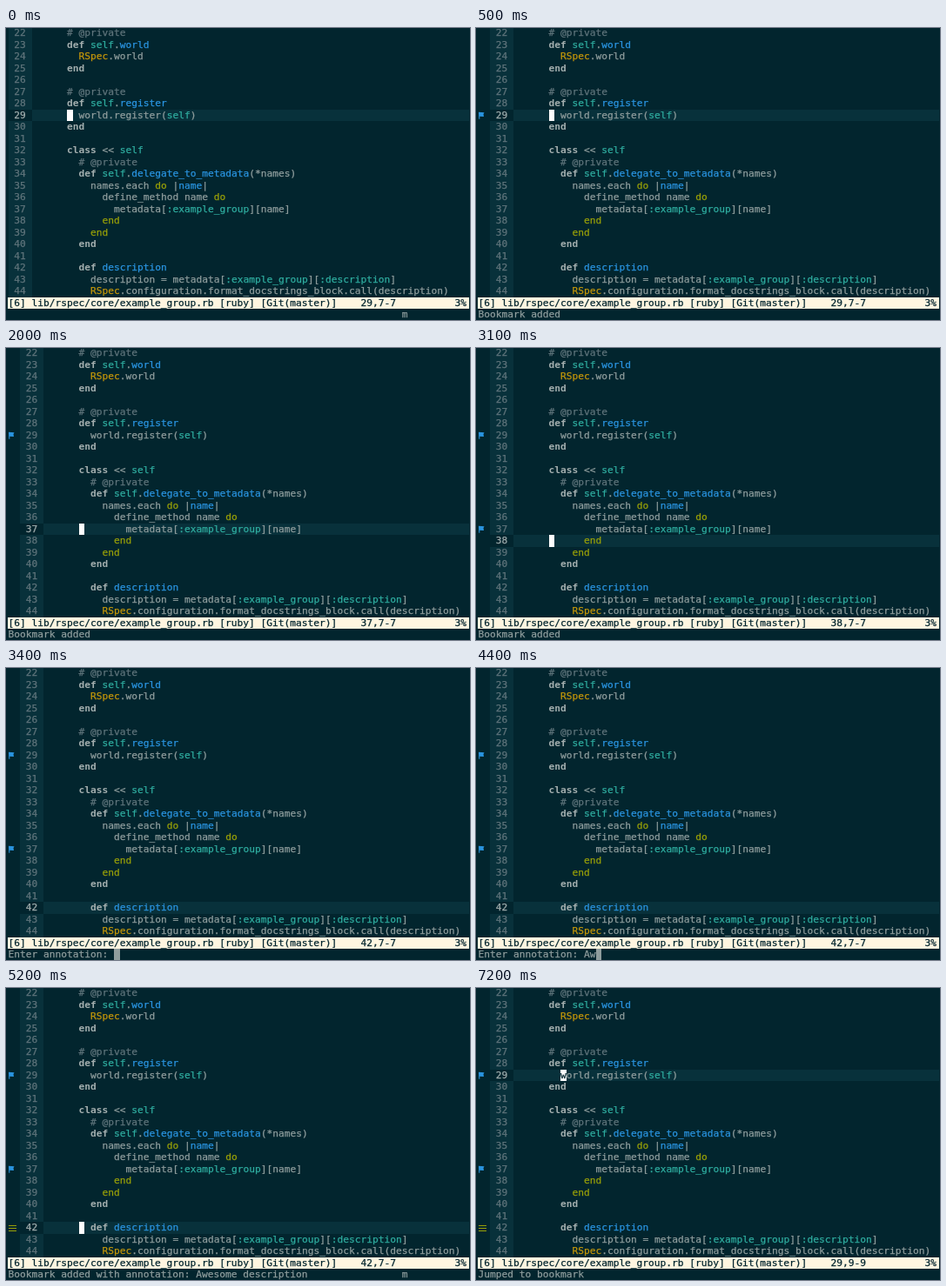
An HTML page with a canvas for the animation above (8 s loop, 533 by 336 pixels).

```html
<!DOCTYPE html>
<html lang="en">
<head>
<meta charset="utf-8">
<title>Editor bookmarks</title>
<style>
html, body { margin: 0; height: 100%; overflow: hidden; background: #02252e; }
canvas { display: block; }
</style>
</head>
<body>
<canvas id="stage" width="533" height="336"></canvas>
<script>
const ctx = document.getElementById('stage').getContext('2d');
const LOOP = 8000, LEFT = 2.5, EDGE = 2, RIGHT = 532, CW = 6.75, RH = 13.5, FIRST = 22;
const BG = '#02252e', RAISED = '#08313b', TEXT = '#8f9d9d', DIM = '#5f747b',
  BRIGHT = '#a3aeae', CREAM = '#fff5e0', WHITE = '#fefefe', CYAN = '#2fac9f',
  BLUE = '#2a94e0', YELLOW = '#c4960a', GREEN = '#98a008';
const FONT = '11.21px "DejaVu Sans Mono", monospace';

const code = `      # @private
      def self.world
        RSpec.world
      end

      # @private
      def self.register
        world.register(self)
      end

      class << self
        # @private
        def self.delegate_to_metadata(*names)
          names.each do |name|
            define_method name do
              metadata[:example_group][name]
            end
          end
        end

        def description
          description = metadata[:example_group][:description]
          RSpec.configuration.format_docstrings_block.call(description)`.split('\n');

// One capture group per colour, in the order of tokenColors
const tokens = /(#.*)|(\bself\b|:\w+)|(RSpec)|(\bdo\b|(?<= {10})end)|((?<=def |def self\.|\|)\w+)|(\b(?:def|class|end)\b)|(\s+|\w+|.)/g;
const tokenColors = [DIM, CYAN, YELLOW, GREEN, BLUE, BRIGHT, TEXT];
const BOLD = 5;

// Each entry changes part of the state from its time on
const timeline = [
  [0, { line: 29, col: 7, flags: [], note: 0, msg: '', cmd: 'm', prompt: false }],
  [500, { flags: [29], msg: 'Bookmark added', cmd: '' }],
  [1500, { line: 30 }],
  [1600, { line: 32 }],
  [1700, { line: 34 }],
  [1900, { line: 36 }],
  [2000, { line: 37 }],
  [2100, { flags: [29, 37] }],
  [3100, { line: 38 }],
  [3200, { line: 40 }],
  [3300, { line: 42 }],
  [3400, { prompt: true }],
  [5200, { prompt: false, note: 42, cmd: 'm',
           msg: 'Bookmark added with annotation: Awesome description' }],
  [7200, { line: 29, col: 9, msg: 'Jumped to bookmark', cmd: '' }]
];

const colX = col => LEFT + col * CW;
const rowY = row => row * RH - 0.75;

// Fills whole pixels between two corners
function rect(x1, y1, x2, y2, color) {
  const [left, top, right, bottom] = [x1, y1, x2, y2].map(Math.round);
  ctx.fillStyle = color;
  ctx.fillRect(left, top, right - left, bottom - top);
}

const fillCell = (col, row, color) =>
  rect(colX(col), rowY(row), colX(col + 1), rowY(row + 1), color);

function write(text, col, row, color, bold) {
  const x = colX(col), y = rowY(row) + 10;
  ctx.font = (bold ? 'bold ' : '') + FONT;
  ctx.fillStyle = ctx.strokeStyle = color;
  ctx.lineWidth = 0.25;
  ctx.fillText(text, x, y);
  if (!bold) ctx.strokeText(text, x, y);
}

function drawCode(text, col, row) {
  for (const m of text.matchAll(tokens)) {
    const kind = m.slice(1).findIndex(g => g !== undefined);
    write(m[0], col + m.index, row, tokenColors[kind], kind === BOLD);
  }
}

function drawFlag(row) {
  const points = [[3, 3], [9.5, 3.5], [8.5, 5.5], [9, 8.3], [4.3, 8], [4.3, 11], [3.3, 11]];
  ctx.fillStyle = BLUE;
  ctx.beginPath();
  for (const [x, y] of points) ctx.lineTo(x, rowY(row) + y);
  ctx.fill();
}

function drawNote(row) {
  const top = Math.round(rowY(row)) + 4;
  for (let y = top; y < top + 9; y += 3) rect(3, y, 12, y + 1, GREEN);
}

function typed(t) {
  if (t < 4400) return '';
  const step = Math.min(7, Math.floor((t - 4400) / 100));
  return 'Awesome description'.slice(0, Math.round(2 + 17 * step / 7));
}

function draw(t) {
  const s = {};
  for (const [time, change] of timeline) if (t >= time) Object.assign(s, change);
  const signs = s.flags.length ? 2 : 0;
  const start = signs + 4;
  const current = s.line - FIRST;

  rect(0, 0, 533, 336, BG);
  rect(colX(signs), 0, colX(start), rowY(23), RAISED);
  rect(colX(signs), rowY(current), colX(start), rowY(current + 1), BG);
  rect(colX(start), rowY(current), RIGHT, rowY(current + 1), RAISED);
  code.forEach((text, row) => {
    write(FIRST + row, signs + 1, row, row === current ? BRIGHT : DIM);
    drawCode(text, start, row);
  });
  s.flags.forEach(line => drawFlag(line - FIRST));
  if (s.note) drawNote(s.note - FIRST);

  if (!s.prompt) {
    const col = start + s.col - 1;
    fillCell(col, current, WHITE);
    write(code[current][s.col - 1] || ' ', col, current, BG);
  }

  rect(EDGE, rowY(23), RIGHT, rowY(24), CREAM);
  write('[6] lib/rspec/core/example_group.rb [ruby] [Git(master)]', 0, 23, BG);
  write(`${s.line},${s.col}-${s.col}`, 60, 23, BG);
  write('3%', 76, 23, BG);

  const msg = s.prompt ? 'Enter annotation: ' + typed(t) : s.msg;
  write(msg, 0, 24, TEXT);
  if (s.prompt) fillCell(msg.length, 24, TEXT);
  else write(s.cmd, 67, 24, TEXT);
}

const begin = performance.now();
function frame() {
  draw((performance.now() - begin) % LOOP);
  requestAnimationFrame(frame);
}
frame();
</script>
</body>
</html>
```
